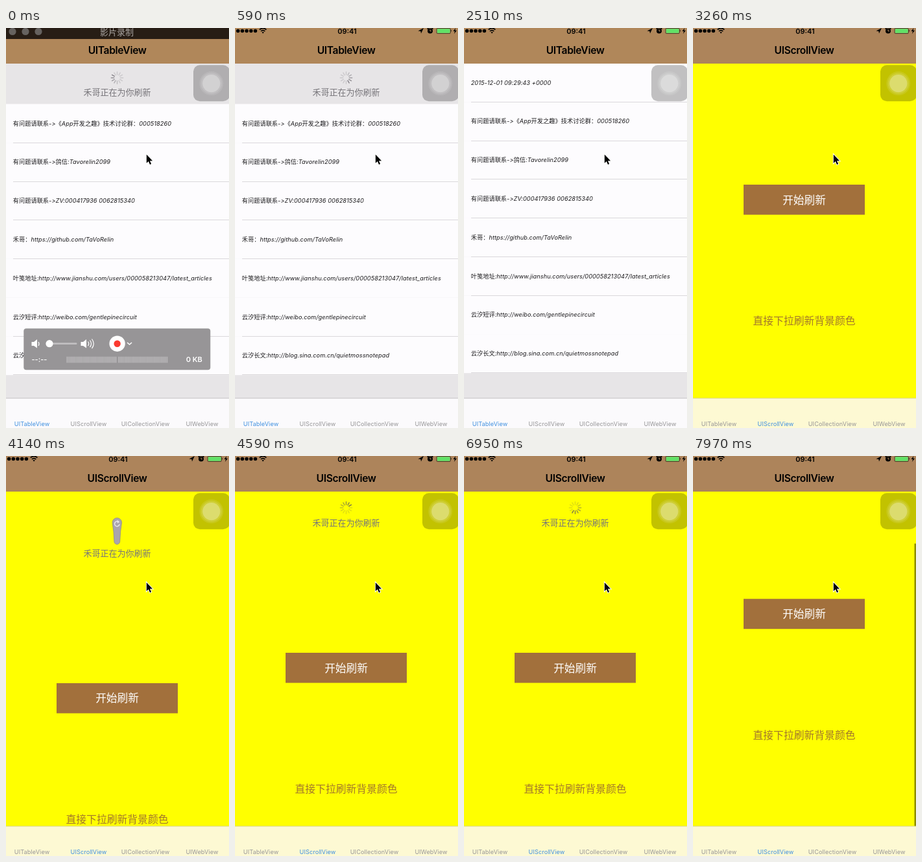
Recreate the animation shown at these times as an HTML page. Size 344x618 px, loop 8 s.

```html
<!DOCTYPE html>
<html lang="zh-CN">
<head>
<meta charset="utf-8">
<title>Pull to refresh</title>
<style>
html, body { margin: 0; width: 100%; height: 100%; overflow: hidden; background: #e7e5e7; }
svg { display: block; width: 100vw; height: 100vh; cursor: default; }
text { font-family: Inter, "Noto Sans CJK SC", "Noto Sans CJK", sans-serif; white-space: pre; }
.mid { text-anchor: middle; }
.row { font-size: 9.17px; fill: #1c1b1d; letter-spacing: .08px; }
.it { font-style: italic; }
.line { fill: #dad8db; shape-rendering: crispEdges; }
.title { font-size: 15.6px; font-weight: 600; letter-spacing: -.33px; }
.tab { font-size: 9.17px; fill: #979698; letter-spacing: .08px; }
.tab.on { fill: #3f90e0; }
.hint { font-size: 13px; fill: #77757a; }
.clock { font-size: 11px; font-weight: 600; }
.hud { fill: #fff; font-size: 11px; font-weight: 600; }
</style>
</head>
<body>
<svg viewBox="0 0 344 618" preserveAspectRatio="none">
  <defs>
    <g id="spokes"></g>
  </defs>

  <g id="tablePage">
    <rect width="344" height="618" fill="#e7e5e7"/>
    <g id="list"></g>
    <g id="head">
      <rect y="-62" width="344" height="62" fill="#e7e5e7"/>
      <use href="#spokes" x="171.5" y="-40"/>
      <text id="headText" class="hint mid" x="171.5" y="-13.2"></text>
    </g>
  </g>

  <g id="scrollPage">
    <rect width="344" height="618" fill="#ffff00"/>
    <g id="content">
      <use id="wheel" href="#spokes" x="171.5" y="18"/>
      <text class="hint mid" x="171.5" y="45.8">禾哥正在为你刷新</text>
      <rect x="78" y="242" width="187" height="46.5" fill="#a2703c"/>
      <text class="mid" x="171.5" y="271.5" font-size="16.7" fill="#fff">开始刷新</text>
      <text class="mid" x="171.5" y="458" font-size="15.8" fill="#a2762c">直接下拉刷新背景颜色</text>
    </g>
    <g id="drop">
      <path id="dropShape" fill="#aaa5ac" stroke="#918c88" stroke-width=".8"/>
      <g id="dropIcon" fill="none" stroke="#e9e6ea" stroke-width="1.5">
        <path d="M3 -2.4A3.8 3.8 0 1 0 3.8 .6"/>
        <path d="M.3 -6L3.6 -3.2L.5 -.8Z" fill="#e9e6ea" stroke="none"/>
      </g>
    </g>
    <rect id="bar" x="341.5" width="2.5" height="437" fill="#000" opacity=".45"/>
  </g>

  <rect id="nav" width="344" height="55"/>
  <text id="title" class="title mid" x="171.6" y="40"></text>

  <g id="status">
    <g id="dots"></g>
    <path d="M37.8 2.6Q43 -2 48.4 2.6M39.9 5Q43 2.4 46.3 5" fill="none" stroke="#000" stroke-width="1.6"/>
    <path d="M41.4 6.7Q43.1 5.3 44.8 6.7L43.1 8.6Z"/>
    <text class="clock mid" x="173" y="8.6">09:41</text>
    <path d="M282.5 4.6L291 0L287 8.6L286.4 5Z"/>
    <circle cx="301" cy="4.6" r="4"/>
    <path d="M296.5 1.6L298.6 0M305.5 1.6L303.4 0" stroke="#000" stroke-width="1.4"/>
    <path d="M301 2.2V4.8H303" stroke="#b1885b" fill="none"/>
    <rect x="311" y=".5" width="21.4" height="8" rx="1.4" fill="none" stroke="#000" stroke-width=".7" opacity=".8"/>
    <rect x="311.8" y="1.2" width="19.8" height="6.6" rx=".8" fill="#62e268"/>
    <path d="M333 2.8q1.6 1.6 0 3.2z"/>
    <path d="M340.4 0L336.6 5H339L338 9L342 3.8H339.5Z"/>
  </g>

  <rect id="tabBar" y="572" width="344" height="46"/>
  <rect id="tabEdge" y="571.5" width="344" height="1"/>
  <g id="tabs"></g>

  <rect x="289" y="57.3" width="56" height="56" rx="10" fill="#000" opacity=".24"/>
  <g fill="#fff">
    <circle cx="316.8" cy="85.6" r="18.5" opacity=".1"/>
    <circle cx="316.8" cy="85.6" r="16.2" opacity=".12"/>
    <circle cx="316.8" cy="85.6" r="13.6" opacity=".28"/>
  </g>

  <g id="recorder">
    <rect width="344" height="17" fill="#271d15"/>
    <g fill="#66625f">
      <circle cx="10" cy="5.5" r="5.6"/><circle cx="30" cy="5.5" r="5.6"/><circle cx="50" cy="5.5" r="5.6"/>
    </g>
    <text class="mid" x="171" y="11" font-size="13" fill="#aaa6a3">影片录制</text>
    <rect x="27.3" y="464.3" width="288" height="64" rx="4" fill="#979597"/>
    <g class="hud">
      <path d="M39.5 485H43L48 481V494.5L43 491H39.5Z"/>
      <path d="M115.5 485H119L124 481V494.5L119 491H115.5Z"/>
      <path d="M50 485q2 3 0 6M126.5 484.5q2.4 3.3 0 6.6M129.5 482.5q4 5.3 0 10.6M132.5 480.5q5.4 7.3 0 14.6" fill="none" stroke="#fff" stroke-width="1.2"/>
      <rect x="67" y="486.3" width="42.5" height="2.8" rx="1.4" fill="#c1bfc1"/>
      <circle cx="67" cy="487.7" r="5.6"/>
      <circle cx="171.6" cy="487.7" r="12.2"/>
      <circle cx="171.6" cy="487.7" r="5.2" fill="#fb3a30"/>
      <path d="M187 486L190.5 489L194 486" fill="none" stroke="#fff" stroke-width="1.6"/>
      <text x="39.5" y="516">--:--</text>
      <path d="M93.5 512.5H171M173 512.5H250" stroke="#b9b7b9" stroke-width="9.5" stroke-dasharray="1.5 .7"/>
      <text x="277.7" y="516.3">0 KB</text>
    </g>
  </g>

  <path transform="translate(216.8 195.4) scale(.84)" d="M0 0v16l3.6-3.4l2.6 6l2.5-1.1l-2.6-5.8h5z" stroke="#fff" stroke-width="2.2" paint-order="stroke"/>
</svg>

<script>
const LOOP = 8000, STEP = 147.7, PITCH = 59.8;
const $ = id => document.getElementById(id);
const show = (id, on) => $(id).style.display = on ? '' : 'none';
const move = (id, x, y) => $(id).setAttribute('transform', `translate(${x} ${y})`);

function add(parent, tag, attrs, text = '') {
  const el = document.createElementNS('http://www.w3.org/2000/svg', tag);
  for (const k in attrs) el.setAttribute(k, attrs[k]);
  el.textContent = text;
  return parent.appendChild(el);
}

// Eased value through [time, value] keys
function track(t, keys) {
  if (t <= keys[0][0]) return keys[0][1];
  for (let i = 1; i < keys.length; i++) {
    const [t0, a] = keys[i - 1], [t1, b] = keys[i];
    if (t < t1) {
      const u = (t - t0) / (t1 - t0);
      return a + (b - a) * u * u * (3 - 2 * u);
    }
  }
  return keys[keys.length - 1][1];
}

const rows = [
  '2015-12-01 09:29:43 +0000',
  '有问题请联系->《App开发之趣》技术讨论群：000518260',
  '有问题请联系->鸽信:Tavorelin2099',
  '有问题请联系->ZV:000417936 0062815340',
  '禾哥：https://github.com/TaVoRelin',
  '叶笺地址:http://www.jianshu.com/users/000058213047/latest_articles',
  '云汐短评:http://weibo.com/gentlepinecircuit',
  '云汐长文:http://blog.sina.com.cn/quietmossnotepad'
];
const lines = rows.map((label, i) => {
  const g = add($('list'), 'g', { transform: `translate(0 ${(i - 1) * PITCH})` });
  if (!i) g.id = 'dateRow';
  add(g, 'rect', { width: 344, height: PITCH + .2, fill: '#fdfcfe' });
  const text = add(g, 'text', { class: 'row', x: 10.7, y: 33.2 });
  // Only the Latin runs slant
  for (const run of label.match(/[\x20-\x7e]+|[^\x20-\x7e]+/g))
    add(text, 'tspan', { class: run.charCodeAt(0) < 127 ? 'it' : '' }, run);
  return g;
}).map(g => add(g.parentNode, 'rect', {
  class: 'line', x: 10.7, width: 334, height: 1,
  y: PITCH - .5, transform: g.getAttribute('transform')
}));
lines[0].id = 'dateLine';

const spokes = Array.from({ length: 12 }, (_, i) => add($('spokes'), 'path', {
  d: 'M0 -4.8V-9.2', stroke: '#5c5960', 'stroke-width': 1.4,
  'stroke-linecap': 'round', transform: `rotate(${i * 30})`
}));

for (let i = 0; i < 5; i++) add($('dots'), 'circle', { cx: 4.6 + i * 6.7, cy: 4.6, r: 2.75 });

const names = ['UITableView', 'UIScrollView', 'UICollectionView', 'UIWebView'];
const tabs = names.map((name, i) =>
  add($('tabs'), 'text', { x: 40 + i * 87.5, y: 614.6 }, name));

// Clockwise wheel, one turn a second, leading spoke darkest
function spin(angle, dark) {
  const lead = Math.floor(angle / 30);
  spokes.forEach((s, i) => {
    const age = (((lead - i) % 12) + 12) % 12;
    s.setAttribute('opacity', Math.max(.2, dark - age * .1));
  });
}

function drawTable(t) {
  const inserted = t > 1700;
  spin(300 + t * .36, .7);
  move('list', 0, track(t, [[1630, 117.4], [1770, 118.6], [2215, 114.3]]));
  move('head', 0, track(t, [[1630, 117], [1770, 116], [2215, 55]]));
  $('headText').textContent = t < 1600 ? '禾哥正在为你刷新' : '刷新完成';
  show('dateRow', inserted);
  show('dateLine', inserted);
  lines[5].style.opacity = t < 1700 ? 0 : 1;
  lines[6].style.opacity = t > 2200 ? 0 : 1;
}

function drawDrop(pull) {
  const stretch = Math.max(0, (pull - 62) * .62), k = Math.min(1, stretch / 29);
  const foot = 23 + pull, top = foot - stretch, R = 8 - .8 * k, r = 8 - 3.6 * k;
  const x = 171.3, mid = (top + foot) / 2;
  $('dropShape').setAttribute('d',
    `M${x - R} ${top}A${R} ${R} 0 0 1 ${x + R} ${top}` +
    `Q${x + r + .3} ${mid} ${x + r} ${foot}A${r} ${r} 0 0 1 ${x - r} ${foot}` +
    `Q${x - r - .3} ${mid} ${x - R} ${top}Z`);
  move('dropIcon', x, top + 2 * k);
}

function drawScroll(t) {
  const pull = track(t, [[3800, 0], [4135, 109], [4580, 62], [7240, 62], [7540, 0], [7680, 0], [7970, -21.3]]);
  const dropping = t < 4200;
  spin(300 + (t - 5180) * .36, .85);
  move('content', 0, pull);
  show('wheel', !dropping);
  show('drop', dropping && pull > 10);
  drawDrop(pull);
  show('bar', t > 7680);
  $('bar').setAttribute('y', 114 - pull);
}

function draw(now) {
  const t = Math.floor((now % LOOP + 8) / STEP) * STEP;
  const page = t < 3240 ? 0 : 1;
  show('tablePage', !page);
  show('scrollPage', page);
  if (page) drawScroll(t); else drawTable(t);

  $('title').textContent = names[page];
  tabs.forEach((tab, i) => tab.setAttribute('class', 'tab mid' + (i === page ? ' on' : '')));
  $('nav').setAttribute('fill', page ? '#ad845b' : '#b0875a');
  $('tabBar').setAttribute('fill', page ? '#fdf9d3' : '#fbfafc');
  $('tabEdge').setAttribute('fill', page ? '#d9d58c' : '#c3c1c4');

  const hud = track(t, [[0, 1], [450, 0]]);
  $('recorder').style.opacity = hud;
  show('status', hud < 1);
}

const start = performance.now();
function tick() {
  draw(performance.now() - start);
  requestAnimationFrame(tick);
}
tick();
</script>
</body>
</html>
```
